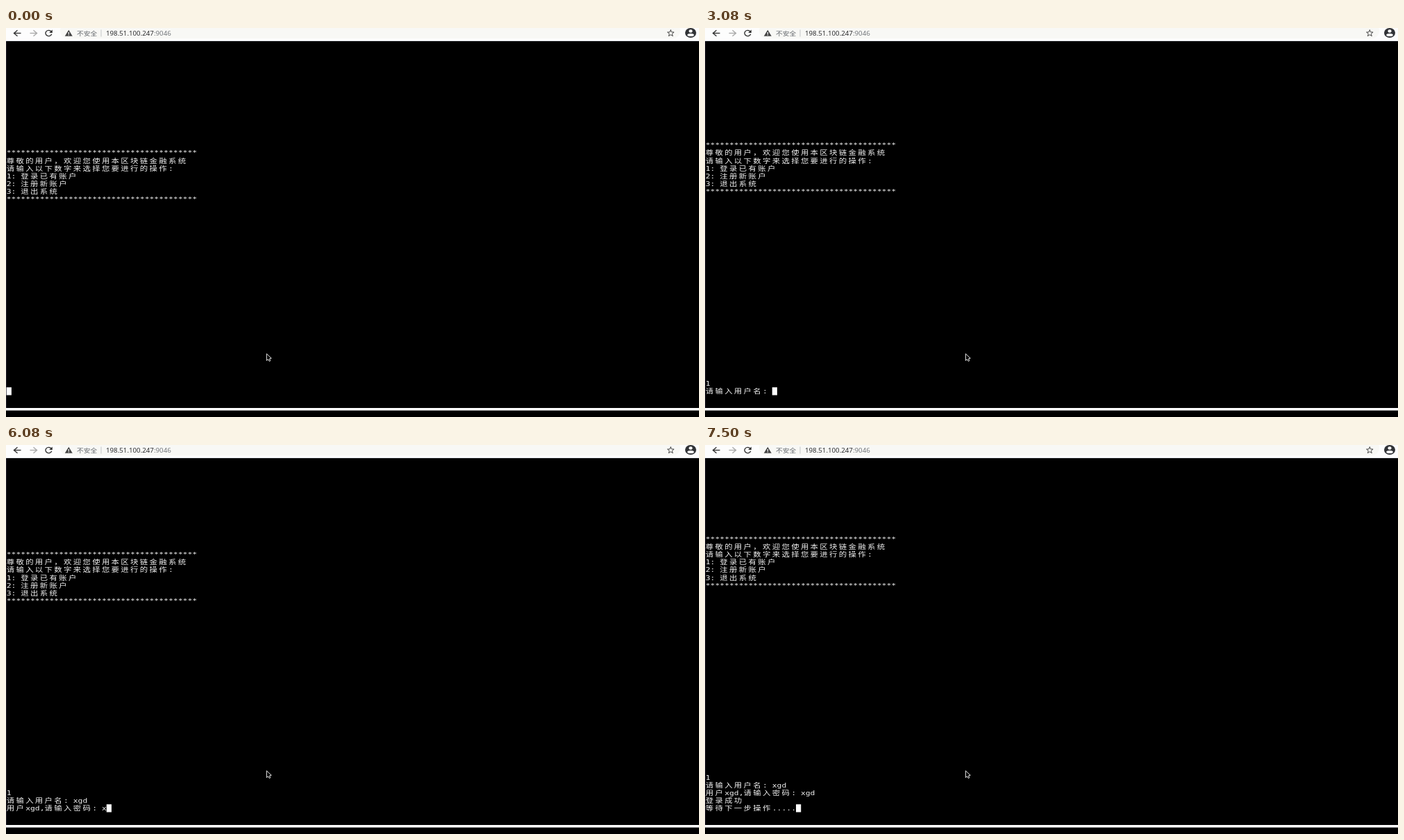
Write an HTML page with a canvas that moves like this. It is 998 by 561 pixels and loops after 8 s.

```html
<!DOCTYPE html>
<html lang="zh-CN">
<head>
<meta charset="utf-8">
<title>Terminal login</title>
<style>
html, body { margin: 0; width: 100%; height: 100%; overflow: hidden; background: #000; }
canvas { display: block; }
</style>
</head>
<body>
<canvas id="stage" width="998" height="561"></canvas>
<script>
const ctx = document.getElementById('stage').getContext('2d');
const LOOP = 8000;
const ASPECT = 1.197;
const CELL = 6.86, ROW = 11.09, LEFT = 0.7, BASE = 527.2;
const MONO = '9.53px "DejaVu Sans Mono", "Noto Sans CJK SC", monospace';
const SANS = '8.15px "Open Sans", "Noto Sans CJK SC", sans-serif';

const USER = 'xgd';
const STARS = '*'.repeat(40);
const BANNER = [
  STARS,
  '尊敬的用户，欢迎您使用本区块链金融系统',
  '请输入以下数字来选择您要进行的操作:',
  '1: 登录已有账户',
  '2: 注册新账户',
  '3: 退出系统',
  STARS
];
const GAP = Array(24).fill('');

const KEYS = { choice: [1580], name: [3330, 3920, 4080], pass: [6080, 6420, 6830] };
const ENTER = { choice: 1920, name: 4500, pass: 7250 };

const typed = (word, times, t) => word.slice(0, times.filter(k => t >= k).length);

function logLines(t) {
  const out = [typed('1', KEYS.choice, t)];
  if (t >= ENTER.choice) out.push('请输入用户名: ' + typed(USER, KEYS.name, t));
  if (t >= ENTER.name) out.push(`用户${USER},请输入密码: ` + typed(USER, KEYS.pass, t));
  if (t >= ENTER.pass) out.push('登录成功', '等待下一步操作.....');
  return out;
}

function text(str, x, y, font, color) {
  ctx.save();
  ctx.scale(ASPECT, 1);
  ctx.font = font;
  ctx.fillStyle = color;
  ctx.fillText(str, x / ASPECT, y);
  ctx.restore();
}

function rect(x, y, w, h, color) {
  ctx.fillStyle = color;
  ctx.fillRect(x, y, w, h);
}

function path(points, close) {
  ctx.beginPath();
  for (const [x, y] of points) ctx.lineTo(x, y);
  if (close) ctx.closePath();
}

function stroke(color, width) {
  ctx.strokeStyle = color;
  ctx.lineWidth = width;
  ctx.stroke();
}

function disc(x, y, rx, ry, color) {
  ctx.beginPath();
  ctx.ellipse(x, y, rx, ry, 0, 0, Math.PI * 2);
  ctx.fillStyle = color;
  ctx.fill();
}

// Draws one line on the cell grid and returns the column after it.
function gridLine(str, y) {
  let col = 0;
  for (const ch of str) {
    if (ch !== ' ') text(ch, LEFT + col * CELL, y, MONO, '#f2f2f2');
    col += ch > '\u2e80' ? 2 : 1;
  }
  return col;
}

function arrow(x, dir, color) {
  path([[x - 5 * dir, 7.5], [x + 5 * dir, 7.5]]);
  stroke(color, 1.4);
  path([[x, 3.2], [x - 5 * dir, 7.5], [x, 11.8]]);
  stroke(color, 1.4);
}

function reload() {
  ctx.beginPath();
  ctx.ellipse(61.5, 7.5, 4.5, 4, 0, 0.3, Math.PI * 1.78);
  stroke('#333', 1.4);
  path([[66.8, 2.6], [66.8, 7], [62.2, 7]], true);
  ctx.fillStyle = '#333';
  ctx.fill();
}

function warning() {
  path([[90.3, 2.8], [95.8, 11.8], [84.8, 11.8]], true);
  ctx.fillStyle = '#444';
  ctx.fill();
  rect(89.7, 6, 1.3, 2.7, '#fff');
  rect(89.7, 9.5, 1.3, 1.1, '#fff');
}

function star(cx, cy) {
  const pts = Array.from({ length: 10 }, (_, i) => {
    const a = -Math.PI / 2 + i * Math.PI / 5, r = i % 2 ? 2.1 : 5;
    return [cx + r * Math.cos(a), cy + r * Math.sin(a)];
  });
  path(pts, true);
  stroke('#444', 1);
}

function avatar() {
  disc(986, 7, 8, 7, '#303236');
  disc(986, 4.5, 2.6, 2.2, '#fff');
  disc(986, 10, 4.8, 2.1, '#fff');
}

function browserBar() {
  rect(0, 0, 998, 19, '#fdfdfd');
  ctx.beginPath();
  ctx.roundRect(78, -7, 893, 22, 11);
  ctx.fillStyle = '#f8f8f5';
  ctx.fill();
  rect(0, 18, 998, 1, '#dfe3e8');
  arrow(16.5, 1, '#333');
  arrow(39.5, -1, '#aaa');
  reload();
  warning();
  text('不安全', 102, 10.7, SANS, '#5f6368');
  rect(136.5, 2.5, 1, 10, '#c4c6c8');
  const host = '198.51.100.247';
  text(host, 144, 10.5, SANS, '#202124');
  ctx.font = SANS;
  text(':9046', 144 + ctx.measureText(host).width * ASPECT, 10.5, SANS, '#6c7075');
  star(957.3, 7.6);
  avatar();
}

function pointer() {
  path([[375.3, 469.8], [375.3, 479.6], [377.6, 477.8], [379.2, 480.6],
        [380.8, 479.8], [379.4, 477], [382.2, 476.4]], true);
  ctx.fillStyle = '#000';
  ctx.fill();
  stroke('#eee', 1);
}

function draw(t) {
  rect(0, 0, 998, 561, '#000');
  rect(0, 19, 1, 529, '#211d29');
  browserBar();

  const lines = [...BANNER, ...GAP, ...logLines(t)];
  let col = 0;
  lines.forEach((line, i) => {
    col = gridLine(line, BASE - (lines.length - 1 - i) * ROW);
  });
  rect(LEFT + col * CELL, 518.2, 7.2, 11.3, '#fff');

  rect(0, 548, 998, 3.6, '#fff');
  pointer();
}

const start = performance.now();
function tick() {
  draw((performance.now() - start) % LOOP);
  requestAnimationFrame(tick);
}
tick();
</script>
</body>
</html>
```
